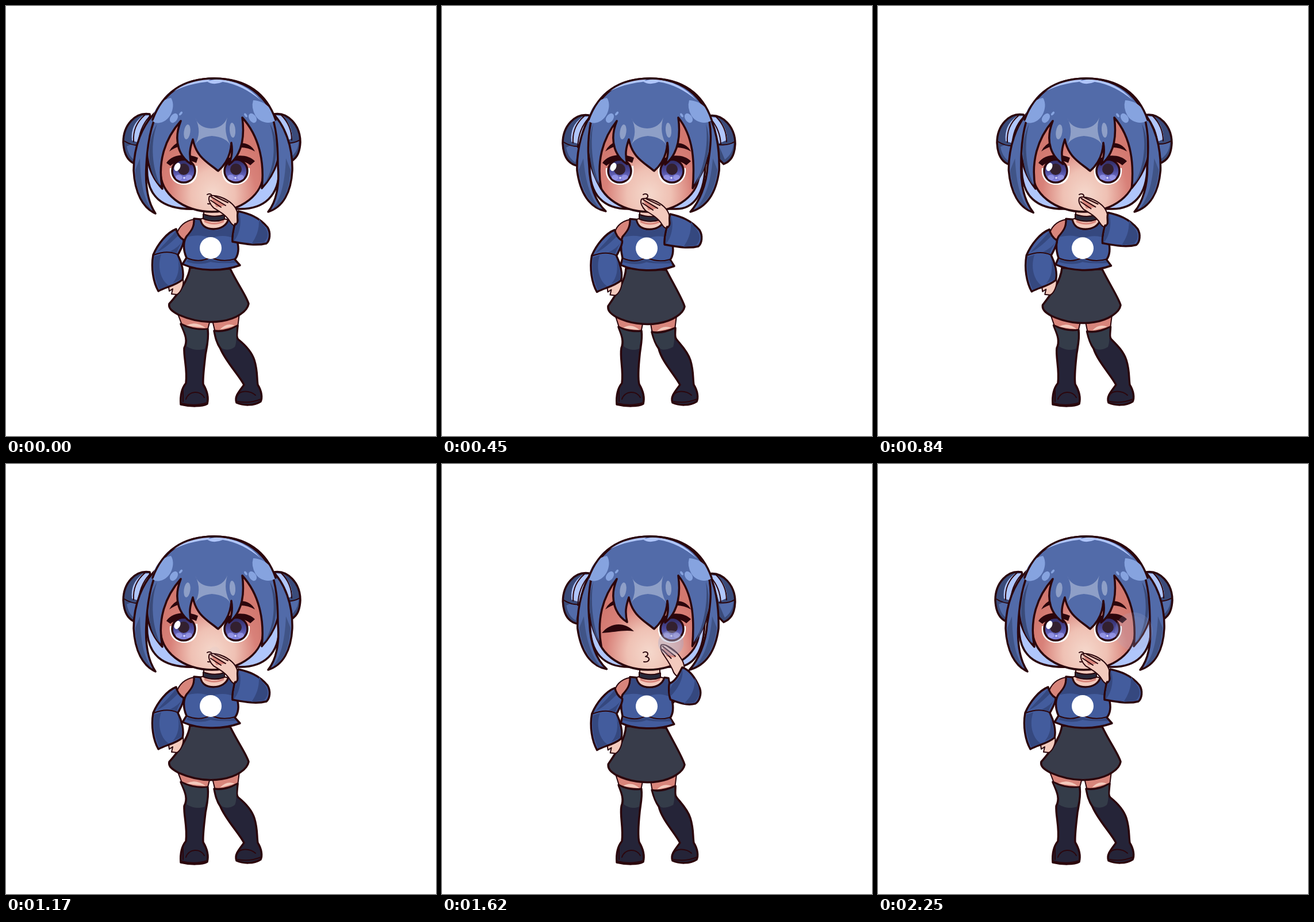
These frames come from a looping animation (748 px wide and 748 px high, 2.28 s). An HTML page:

```html
<!DOCTYPE html>
<html lang="en">
<head>
<meta charset="utf-8">
<style>
html, body { margin: 0; width: 100%; height: 100%; overflow: hidden; background: #fff; }
svg { display: block; width: 100vw; height: 100vh; }
.line { stroke: #2b060c; stroke-width: 3.5; stroke-linejoin: round; stroke-linecap: round; }
.thin { stroke: #2b060c; stroke-width: 2; stroke-linejoin: round; stroke-linecap: round; }
.none { fill: none; }
.hair { fill: #526ba9; }
.shade { fill: #3a4b7a; }
.gloss { fill: #86a3df; }
.pale { fill: #b0c6fb; }
.grey { fill: #8e9fc7; }
.skin { fill: #f3cabd; }
.flush { fill: #d8857b; }
.cloth { fill: #435c9d; }
.navy { fill: #35487f; }
.skirt { fill: #383c4a; }
.sock { fill: #343c49; }
.boot { fill: #252438; }
.ink { fill: #2b060c; }
</style>
</head>
<body>
<!-- "a~b" in a path blends from a to b; data-by names the driving value -->
<svg viewBox="0 0 748 748">
<defs>
  <radialGradient id="face" gradientUnits="userSpaceOnUse" cx="0" cy="0" r="1" gradientTransform="translate(360 328) scale(100 112)">
    <stop offset="0" stop-color="#f5d8cc"/><stop offset=".38" stop-color="#efc1b4"/>
    <stop offset=".75" stop-color="#d88179"/><stop offset="1" stop-color="#d2786f"/>
  </radialGradient>
  <linearGradient id="iris" x1="0" y1="0" x2="0" y2="1">
    <stop offset=".1" stop-color="#34306c"/><stop offset=".5" stop-color="#4c4b9b"/>
    <stop offset=".9" stop-color="#7f80da"/>
  </linearGradient>
  <g id="eye">
    <path fill="#fff" d="M-23 -4C-25 14 -14 26 4 25C20 24 27 12 25 -8Z"/>
    <circle class="line" r="20" cx="1" cy="1" fill="url(#iris)" stroke-width="2.6"/>
    <circle r="10" cx="1" cy="-2" fill="#33202f"/>
    <ellipse cx="-7" cy="12" rx="6" ry="4.5" fill="#a9a9f5" opacity=".6"/>
    <ellipse cx="10" cy="12" rx="6" ry="4.5" fill="#a9a9f5" opacity=".6"/>
    <circle cx="2" cy="13" r="1.8" fill="#dcdcff"/>
  </g>
</defs>

<g id="legs">
  <path class="thin flush" data-by="p" d="M299~302 536~540L356~350 543~548L350~346 566~568L307~309 557~562Z"/>
  <path class="thin flush" data-by="p" d="M358~362 543~547L406~408 535~539L403~405 559~563L364~366 568~570Z"/>
  <path class="skin" data-by="p" d="M313~315 556~560Q330 547~551 347~344 560~564Z"/>
  <path class="skin" data-by="p" d="M372~374 563~566Q384 550~554 398~400 556~560Z"/>
  <path class="line boot" data-by="p" d="M304~307 553~558C318 560~564 335 564~567 351~347 562~565C353~349 580 349~345 595 347~344 606C345~342 625 342~340 645 343 658C349 668 353 680 350 692C342 697 320 697 304 693C303 680 304 667 313 656C316 632 309 612 310~312 595C318 580 309 566 304~307 553~558Z"/>
  <path class="line boot" data-by="p" d="M362~365 565~567C378 567~570 392 562~566 403~406 556~560C402~406 570 400~404 576 404~408 580C414 588 427 600 432 616C438 635 436 648 438 659C445 670 446 682 443 688C431 696 412 695 401 690C397 680 405 671 414 659C406 643 382 618 373~377 596C366~370 586 364~367 575 362~365 565~567Z"/>
  <path class="sock" data-by="p" d="M306~309 555~560C318 562~566 335 565~569 349~345 563~567C351~347 578 348~344 589 346~343 596C336 600 323 598 314~316 592C318 578 311 567 306~309 555~560Z"/>
  <path class="sock" data-by="p" d="M364~367 567~569C378 569~572 392 564~568 401~404 558~562C400~404 572 402~405 585 398~402 593C390 599 381 599 375~379 595C368~371 586 366~369 576 364~367 567~569Z"/>
  <path class="thin none" d="M308 688V667M313 684C318 669 338 668 345 681M305 691Q328 697 350 690M402 679C405 668 424 668 434 677M403 688Q424 692 443 684"/>
</g>

<path class="line skirt" data-by="p" d="M320 455~456C317~319 478 300~304 500 284~289 518~522C282~288 526~530 289~293 531~535 300~303 537~541C325 548~552 352 552~556 376 548~552C401 544~548 420 531~535 422 518~523C419 506~511 403~405 484~488 390 457~459Z"/>

<g id="torso">
  <path class="thin skin" d="M344 354H379V370L387 372C385 385 374 390 361 389C347 388 339 382 337 371L344 369Z"/>
  <path class="flush" d="M345 372Q362 382 379 372V376Q362 384 345 376Z"/>
  <path class="thin" fill="#29293a" d="M343 362Q362 369 380 363V371Q362 378 343 370Z"/>
  <path class="thin flush" data-by="p" d="M327 371C310 374 300 385~386 296~300 399C302~304 406 309 409 314 404C323 395 329 385 327 371Z"/>
  <path class="thin flush" d="M391 376Q405 382 411 398L403 415L394 403Z"/>
  <path class="line cloth" data-by="p" d="M327 370L338 371C340 383 349 388 361 388C373 388 384 382 387 371L394 372C399~397 387 395 399 402~400 409C406~403 422 404~402 434 398~397 441L407~404 451~452C374 463 335 461 307~311 449~450L314 438C307~310 422 309~311 408 314 401C323 391 328 384 327 370Z"/>
  <path class="navy" data-by="p" d="M329 373L337 373C340 385 349 390 361 390C373 390 385 384 388 373L393 374C397~395 387 395 397 400~398 405C382 398 370 399 357 404C343 398 328 398 315 402C323 393 329 385 329 373Z"/>
  <path class="navy" d="M317 440C335 446 345 443 356 440C370 446 383 446 396 442L400 447Q365 448 356 445Q338 452 314 445Z"/>
  <path class="thin none" d="M314 438C330 445 345 443 356 437C370 444 385 444 398 440"/>
  <circle cx="356" cy="421" r="19" fill="#fff"/>
</g>

<g id="restingArm">
  <path class="thin skin" d="M283 489C288 482 300 475 308 475C310 485 304 499 297 502L288 501L290 492L284 496Z"/>
  <path class="line cloth" d="M296 388C280 394 264 414 256 433C252 455 256 480 265 496C279 488 292 488 307 476C310 464 306 447 299 433C303 425 310 414 309 407C302 403 297 395 296 388Z"/>
  <path class="navy" d="M263 428C270 419 285 405 295 392L299 400C288 410 279 420 263 428ZM307 409C302 418 298 424 297 430L285 427Q300 420 307 409Z"/>
  <path class="navy" d="M258 436C255 458 260 478 267 493L283 486C268 476 263 452 270 432ZM299 439Q308 462 305 475L290 482Q304 466 299 439Z"/>
  <path class="thin none" d="M257 433Q280 424 298 432"/>
</g>

<g id="head">
  <g id="bunL">
    <path class="line shade" d="M250 188C225 184 204 207 204 237C205 260 214 273 230 276L260 240Z"/>
    <path class="pale" d="M238 191L249 190L232 238L219 234Q216 207 238 191Z"/>
    <path class="hair" d="M219 240L234 243L226 270Q213 262 210 244Z"/>
    <path class="thin none" d="M241 190Q220 208 222 236M250 192Q231 212 230 244M206 235Q220 244 236 242"/>
  </g>
  <g id="bunR">
    <path class="line shade" d="M466 188C490 184 512 207 512 237C511 258 504 267 492 272L460 240Z"/>
    <path class="pale" d="M470 190L479 191Q497 204 498 230L484 236Z"/>
    <path class="hair" d="M484 241L509 236Q508 254 494 264Z"/>
    <path class="thin none" d="M479 190Q497 208 497 233M469 193Q486 212 487 238M484 238Q500 240 511 233"/>
  </g>
  <path class="line pale" data-by="s" d="M246~257 270C240~254 335~330 275~282 355 330 353H405C444~436 354 480~458 335~330 475~458 270Z"/>
  <path class="line" fill="url(#face)" d="M269 285C266 327 310 358 358 358C408 358 451 328 447 285C448 240 425 190 410 185H305C285 200 266 240 269 285Z"/>
  <path class="thin none" d="M350 328C357 324 362 332 354 335C364 336 361 346 351 344"/>

  <g id="openEye">
    <use href="#eye" x="308" y="286"/>
    <ellipse cx="298" cy="280" rx="5" ry="7.5" fill="#fff" transform="rotate(25 298 280)"/>
    <path class="ink" d="M279 273C288 258 314 255 334 264L331 273C315 266 298 268 286 278Z"/>
  </g>
  <path id="winkEye" class="ink" d="M278 294C292 276 317 273 334 291C316 288 300 293 278 294Z"/>
  <use href="#eye" transform="translate(401 286) scale(-1 1)"/>
  <path class="ink" d="M377 271C393 257 421 257 433 270L425 277C413 267 395 266 381 276Z"/>
  <path class="ink" d="M284 253Q290 240 304 236L303 244Q294 246 284 253ZM408 238Q426 239 433 253Q421 246 408 246Z"/>

  <path class="line hair" data-by="s" d="M247~252 225C262 160 300 126 362 126C425 126 465 165 474~469 225C480~470 258 470~454 290 445~436 317C450~440 270 440~437 226 411 194C416 232 408 260 388 276C392 264 395 254 392 238C391 259 384 274 369 287C351 272 331 263 325 232C320 247 318 257 322 275C304 264 289 238 304 200C277~280 230 263~268 270 272~277 318C246~260 290 242~252 260 247~252 225Z"/>
  <path class="shade" data-by="s" d="M263 205C252~258 235 252~260 275 268~274 312C243~255 288 244~252 235 263 205ZM459 205C470~464 240 468~456 280 449~440 311C472~462 285 478~470 235 459 205Z"/>
  <path class="pale" d="M275 158Q308 128 357 127L349 132Q308 136 275 158ZM367 127Q414 130 443 164Q411 137 377 132Q361 139 349 131Z"/>
  <path class="line hair" data-by="s" d="M264 181C236~246 206 222~234 246 222~235 286C224~240 325~324 238~256 351 260~285 361~357C246~267 340 242~257 312 244~256 278C246~252 238 252~256 210 264 181Z"/>
  <path class="line hair" data-by="s" d="M460 183C486~476 206 499~483 246 498~482 286C496~477 324 482~461 350 456~432 358C470~447 341 476~460 312 473~462 278C473~469 238 470 210 460 183Z"/>
  <path class="shade" data-by="s" d="M225~238 285C225~242 320 238~258 345 253~276 354C239~258 333 234~250 308 233~246 265ZM495~479 285C493~475 321 482~460 343 465~443 352C477~456 335 485~467 312 487~471 265Z" opacity=".7"/>
  <path class="gloss" d="M255 200C256 180 269 162 287 160C296 173 287 200 268 203Q260 205 255 200ZM430 164C451 165 465 179 469 199C457 207 441 202 434 191Q426 177 430 164Z"/>
  <path class="line none" d="M255 198C272 151 308 126 362 126C419 126 454 153 469 198"/>
  <g class="gloss">
    <ellipse cx="292" cy="195" rx="6" ry="9" transform="rotate(35 292 195)"/>
    <ellipse cx="304" cy="187" rx="2" ry="4" transform="rotate(40 304 187)"/>
    <ellipse cx="429" cy="195" rx="6" ry="9" transform="rotate(-35 429 195)"/>
    <ellipse cx="417" cy="190" rx="2" ry="4" transform="rotate(-35 417 190)"/>
  </g>
  <g class="grey">
    <path d="M329 194Q335 212 357 213Q378 212 385 194Q377 219 391 243Q383 228 358 226Q336 228 328 243Q342 219 329 194Z"/>
    <ellipse cx="315" cy="219" rx="5.5" ry="13" transform="rotate(8 315 219)"/>
    <ellipse cx="394" cy="216" rx="5" ry="13" transform="rotate(-4 394 216)"/>
  </g>
</g>

<g id="kissArm">
  <path class="thin skin" data-by="q" d="M354~406 331~299C363~414 327~299 382~429 334~311 393~436 344~329C402~441 352~339 407~440 367~347 402~435 381~355C398~430 384~361 393~424 381~360 389~418 374~351C383~416 364~339 371~411 357~325 361~407 351~313C355~405 345~309 351~404 337~303 354~406 331~299Z"/>
  <path class="flush" data-by="q" d="M357~407 333~302L382~429 347~326L366~413 350~320Z"/>
  <path class="thin none" data-by="q" d="M357~408 332~303L382~428 347~322M356~407 338~308L374~421 350~326M363~414 331~301L386~431 342~317"/>
  <path class="line cloth" data-by="q" d="M404~433 357~348C422~440 361~352 440~445 367~368 455~449 385~390C461~451 395~402 459~444 408~413 453~437 413~416C434~425 418~419 411~417 413~413 394~405 410~406C393~399 398~397 399~397 374~388 399~398 380~380C407~413 378~373 400~425 366~361 404~433 357~348Z"/>
  <path class="navy" data-by="q" d="M405~432 360~351C411~434 372~363 407~420 399~382 396~403 409~397C395~400 394~390 400~401 382~382 403~415 378~374C408~425 374~365 402~430 366~356 405~432 360~351Z"/>
  <path class="navy" data-by="q" d="M440~444 370~369C441~446 390~385 435~439 402~405 427~420 414~416L449~436 411~414C456~449 404~404 457~448 396~390 452~446 387~379Z"/>
</g>
<g id="coin">
  <circle r="1" fill="#a5a9c9" opacity=".62"/>
  <circle r=".8" fill="#b6b2cb" opacity=".3"/>
</g>
</svg>
<script>
const LOOP = 2280, BEAT = 1140, STEP = 30;
const get = id => document.getElementById(id);
const clamp = x => Math.min(1, Math.max(0, x));
const ease = x => (1 - Math.cos(Math.PI * clamp(x))) / 2;
const ramp = (t, from, to) => ease((t - from) / (to - from));
const mix = (a, b, k) => a + (b - a) * k;
const show = (id, on) => get(id).setAttribute("visibility", on ? "visible" : "hidden");
const move = (id, x, y, scale = 1) =>
  get(id).setAttribute("transform", `translate(${x} ${y}) scale(${scale})`);

const blends = [...document.querySelectorAll("[data-by]")].map(el =>
  ({ el, by: el.dataset.by, d: el.getAttribute("d") }));
const blend = (d, k) => d.replace(/([\d.]+)~([\d.]+)/g, (_, a, b) => mix(+a, +b, k).toFixed(2));

function draw(t) {
  const beat = t % BEAT;
  const sway = beat < 570 ? ramp(beat, 0, 570) : 1 - ramp(beat, 570, 1080);
  const kiss = ramp(t, 1470, 1740) - ramp(t, 1980, 2220);
  const k = { p: sway / 0.9, s: sway ** 1.3 / 0.87, q: kiss };
  for (const { el, by, d } of blends) el.setAttribute("d", blend(d, k[by]));

  move("bunL", 6 * k.p, 2 * k.p);
  move("bunR", -2 * k.p, 3 * k.p);
  move("restingArm", 4.5 * k.p, 1.5 * k.p);
  move("kissArm", -7 * k.p * (1 - kiss), 5 * k.p * (1 - kiss));
  move("torso", 0, 0.5 * k.p);

  const wink = kiss > 0.5;
  show("openEye", !wink);
  show("winkEye", wink);

  const flight = ramp(t, 1470, 1800);
  move("coin", mix(363, 445, flight), mix(327, 291, flight),
    mix(mix(9, 14, clamp((t - 1140) / 270)), 33, flight));
  get("coin").setAttribute("opacity",
    t < 1140 ? 0 : 0.1 + 0.5 * ramp(t, 1140, 1440) - 0.3 * ramp(t, 1980, 2280));
}

const start = performance.now();
function tick() {
  const t = (performance.now() - start) % LOOP;
  draw(Math.floor(t / STEP) * STEP);
  requestAnimationFrame(tick);
}
tick();
</script>
</body>
</html>
```
